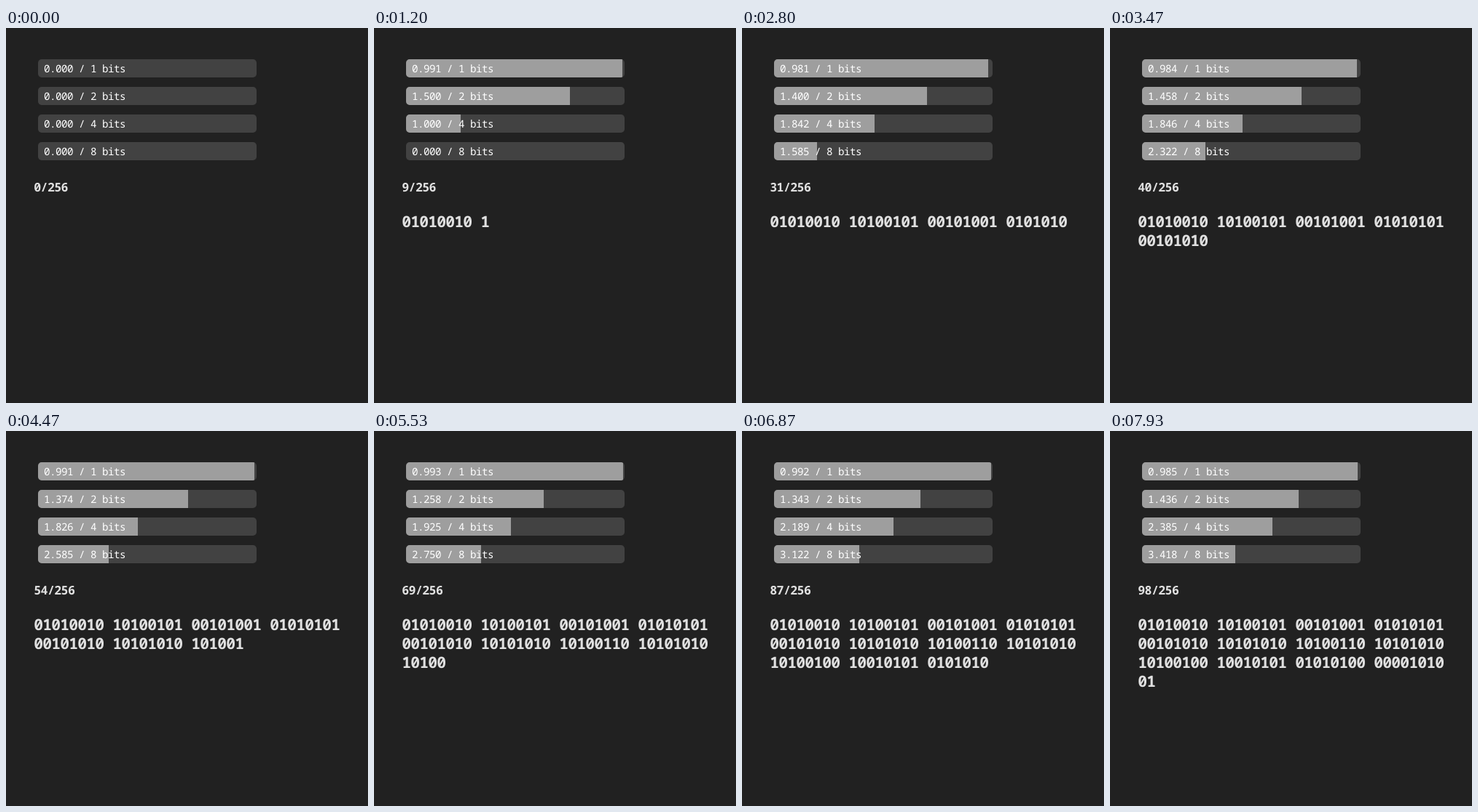
An HTML page for the animation above (8 s loop, 497 by 516 pixels).

```html
<!DOCTYPE html>
<html lang="en">
<head>
<meta charset="utf-8">
<title>Bit entropy</title>
<style>
  html, body { margin: 0; width: 100%; height: 100%; overflow: hidden; background: #212121; }
  svg { display: block; }
  text {
    font-family: "Noto Sans Mono", "DejaVu Sans Mono", monospace;
    letter-spacing: -.0382em;
    text-rendering: geometricPrecision;
  }
  .label { font-size: 14.24px; fill: #fff; }
  .count, .row { font-weight: 700; fill: #e0e0e0; }
  .count { font-size: 16.66px; }
  .row { font-size: 21.36px; }
  .track { fill: #424242; }
  .fill { fill: #9e9e9e; }
</style>
</head>
<body>
<svg id="stage" width="497" height="516" viewBox="0 0 497 516">
  <defs><clipPath id="tracks"></clipPath></defs>
</svg>
<script>
const LOOP = 8000;
const TICK = 1000 / 15;
const TOTAL = 256;
const LEFT = 38.2;
const BAR = { x: 44, width: 300, height: 25 };
const BITS =
  "01010010 10100101 00101001 01010101 " +
  "00101010 10101010 10100110 10101010 " +
  "10100100 10010101 01010100 00001010 01";
const stream = BITS.replace(/ /g, "");

// Ends of the typing bursts: [tick, bits typed]; one idle tick follows each
const BURSTS = [
  [9, 0], [18, 9], [22, 12], [44, 33], [62, 50], [74, 60],
  [83, 69], [89, 74], [103, 87], [107, 89], [116, 96], [119, 98]
];

const stage = document.getElementById("stage");
const clip = document.getElementById("tracks");

function add(parent, tag, attrs) {
  const el = document.createElementNS("http://www.w3.org/2000/svg", tag);
  for (const key in attrs) el.setAttribute(key, attrs[key]);
  return parent.appendChild(el);
}

const bars = [1, 2, 4, 8].map((size, i) => {
  const y = 43 + 38 * i;
  const box = { ...BAR, y, rx: 5 };
  add(clip, "rect", box);
  add(stage, "rect", { ...box, class: "track" });
  const group = add(stage, "g", { "clip-path": "url(#tracks)" });
  const fill = add(group, "rect", { ...BAR, y, class: "fill" });
  const label = add(stage, "text", { x: 52, y: y + 18, class: "label" });
  return { size, fill, label };
});
const counter = add(stage, "text", { x: LEFT, y: 225, class: "count" });
const rows = [0, 1, 2, 3].map(i =>
  add(stage, "text", { x: LEFT, y: 274 + 26 * i, class: "row" }));

function typedAt(tick) {
  const i = BURSTS.findIndex(([end]) => end >= tick);
  if (i < 1) return 0;
  const [idle, before] = [BURSTS[i - 1][0] + 1, BURSTS[i - 1][1]];
  const [end, after] = BURSTS[i];
  return before + Math.round((after - before) * (tick - idle) / (end - idle));
}

// Shannon entropy of the complete blocks of the given size
function entropy(bits, size) {
  const blocks = Math.floor(bits.length / size);
  const counts = {};
  for (let i = 0; i < blocks; i++) {
    const block = bits.substr(i * size, size);
    counts[block] = (counts[block] || 0) + 1;
  }
  return Object.values(counts)
    .reduce((sum, n) => sum + n / blocks * Math.log2(blocks / n), 0);
}

function draw(time) {
  const ms = Math.floor(time % LOOP / 10) * 10;
  // Ticks start on the nearest hundredth of a second
  const typed = typedAt(Math.floor((ms + 4.9) / TICK));
  const bits = stream.slice(0, typed);
  for (const { size, fill, label } of bars) {
    const value = entropy(bits, size);
    fill.setAttribute("width", Math.round(BAR.width * value / size));
    label.textContent = `${value.toFixed(3)} / ${size} bits`;
  }
  counter.textContent = `${typed}/${TOTAL}`;
  rows.forEach((row, i) => {
    const line = bits.slice(32 * i, 32 * i + 32);
    row.textContent = (line.match(/.{1,8}/g) || []).join(" ");
  });
}

const start = performance.now();
function frame() {
  draw(performance.now() - start);
  requestAnimationFrame(frame);
}
frame();
</script>
</body>
</html>
```
